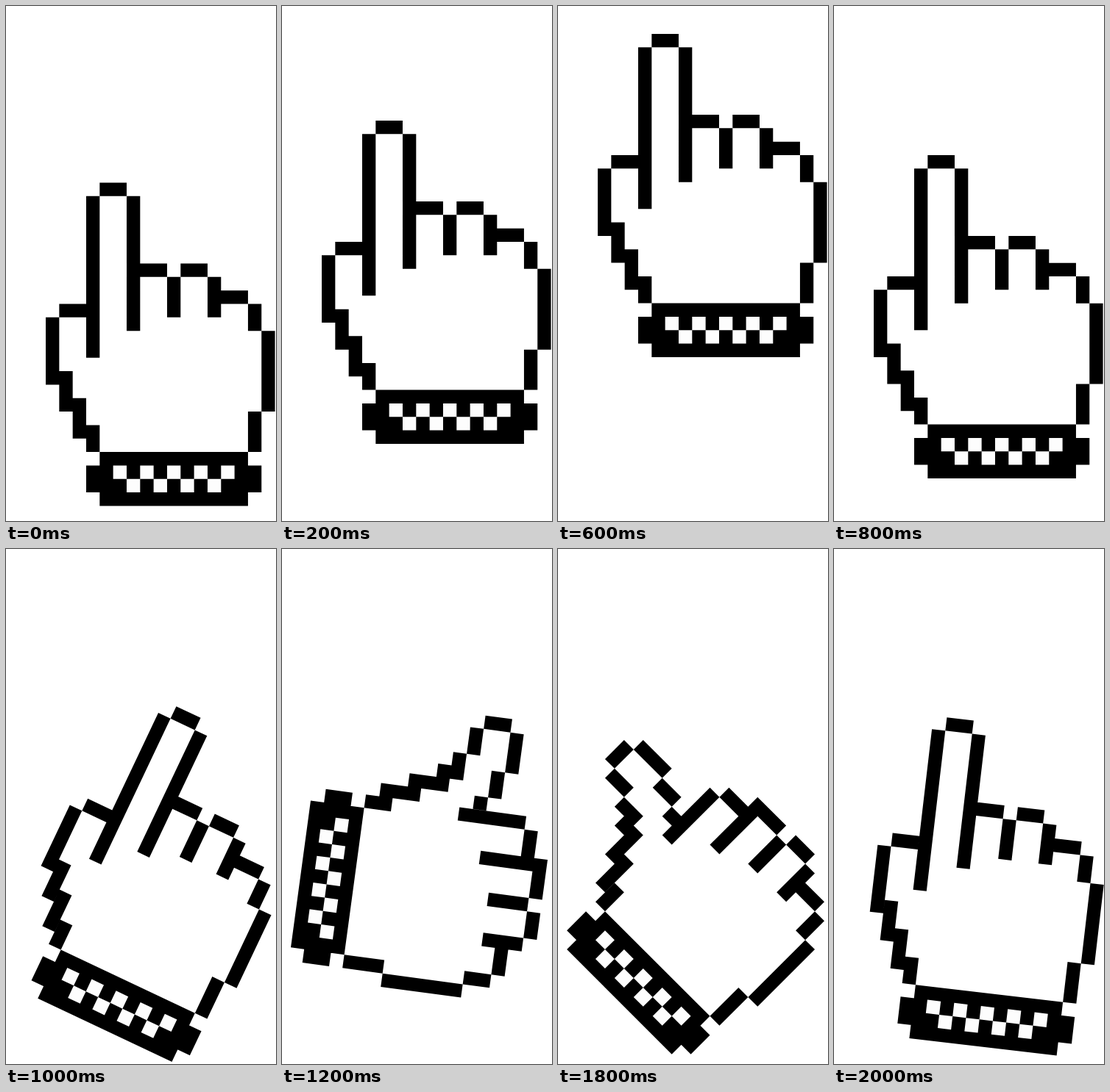
Write an HTML page with a canvas that moves like this. It is 367x701 px and loops after 2.1 s.

```html
<!DOCTYPE html>
<html lang="en">
<head>
<meta charset="utf-8">
<title>Pixel hand</title>
<style>
html, body { margin: 0; width: 100%; height: 100%; overflow: hidden; background: #fff; }
canvas { display: block; width: 367px; height: 701px; }
</style>
</head>
<body>
<canvas id="stage" width="367" height="701"></canvas>
<script>
const ctx = document.getElementById('stage').getContext('2d');
const LOOP = 2100, STEP = 100, CELL = 18.33;

function makeHand(x, y, pivot, build) {
  const ink = new Path2D(), checks = new Path2D();
  const block = path => (c, r, w = 1, h = 1) =>
    path.rect(x + c * CELL, y + r * CELL, w * CELL, h * CELL);
  build(block(ink), block(checks));
  return { pivot, ink, checks };
}

// Each step moves the block by (dc, dr)
function stairs(bar, n, c, r, dc, dr, w, h) {
  for (let i = 0; i < n; i++) bar(c + i * dc, r + i * dr, w, h);
}

// Cuff lying flat: 11 cells long, 4 deep, with a zigzag of checks
function cuff(bar, check) {
  bar(0, 0, 11, 4);
  bar(-1, 1, 13, 2);
  for (let i = 0; i < 9; i++) check(1 + i, 1 + i % 2, 1, 1);
}

const pointer = makeHand(54, 240.5, [238, 459], (bar, check) => {
  // index finger
  bar(4, 0, 2);
  bar(3, 1, 1, 12);
  bar(6, 1, 1, 10);
  // folded fingers
  stairs(bar, 2, 7, 6, 3, 0, 2, 1);
  stairs(bar, 2, 9, 7, 3, 0, 1, 3);
  bar(13, 8, 2);
  // outer edge
  bar(15, 9, 1, 2);
  bar(16, 11, 1, 6);
  bar(15, 17, 1, 3);
  // thumb side
  bar(1, 9, 2);
  bar(0, 10, 1, 5);
  stairs(bar, 2, 1, 14, 1, 2, 1, 3);
  bar(3, 18, 1, 2);
  const shift = put => (c, r, w, h) => put(c + 4, r + 20, w, h);
  cuff(shift(bar), shift(check));
});

const thumb = makeHand(23.5, 369.3, [230, 471], (bar, check) => {
  // slope up to the thumb
  bar(4, -1, 2);
  stairs(bar, 2, 5, -2, 2, -1, 3, 1);
  bar(9, -4, 2);
  stairs(bar, 2, 10, -5, 1, -2, 1, 2);
  // thumb tip and inner side
  bar(12, -8, 2);
  bar(14, -7, 1, 3);
  bar(13, -4, 1, 2);
  bar(12, -2);
  // gaps between the fingers, three rows apart
  for (let i = 0; i < 4; i++) {
    const left = 14 - (3 - i) * (2 - i) / 2;
    bar(left, 3 * i - 1, Math.min(17, 16 + i) - left);
  }
  // knuckles
  bar(16, 0, 1, 2);
  bar(17, 2, 1, 3);
  bar(17, 6, 1, 2);
  bar(15, 9, 1, 2);
  // palm edge
  bar(13, 11, 2);
  bar(7, 12, 6);
  bar(4, 11, 3);
  const turned = put => (c, r, w, h) => put(4 - r - h, c, h, w);
  cuff(turned(bar), turned(check));
});

// Keys are [time, value], eased in and out between neighbours
const liftKeys = [[0, 0], [500, -240], [900, 0], [LOOP, 0]];
const turnKeys = [[0, 0], [900, 0], [1200, 97.7], [1500, 90], [LOOP, 0]];

function track(keys, t) {
  const i = keys.findIndex(k => k[0] > t);
  const [t0, v0] = keys[i - 1], [t1, v1] = keys[i];
  const u = (t - t0) / (t1 - t0);
  return v0 + (v1 - v0) * u * u * (3 - 2 * u);
}

function drawHand({ pivot: [x, y], ink, checks }, angle, lift) {
  ctx.save();
  ctx.translate(x, y + lift);
  ctx.rotate(angle * Math.PI / 180);
  ctx.translate(-x, -y);
  ctx.fillStyle = '#000';
  ctx.fill(ink);
  ctx.fillStyle = '#fdfdfd';
  ctx.fill(checks);
  ctx.restore();
}

const start = performance.now();

function frame() {
  const t = Math.floor((performance.now() - start) % LOOP / STEP) * STEP;
  const turn = track(turnKeys, t);
  ctx.fillStyle = '#fff';
  ctx.fillRect(0, 0, 367, 701);
  // The thumbs-up pose takes over halfway through the quarter turn
  if (turn > 44.9) drawHand(thumb, turn - 90, 0);
  else drawHand(pointer, turn, track(liftKeys, t));
  requestAnimationFrame(frame);
}
frame();
</script>
</body>
</html>
```
